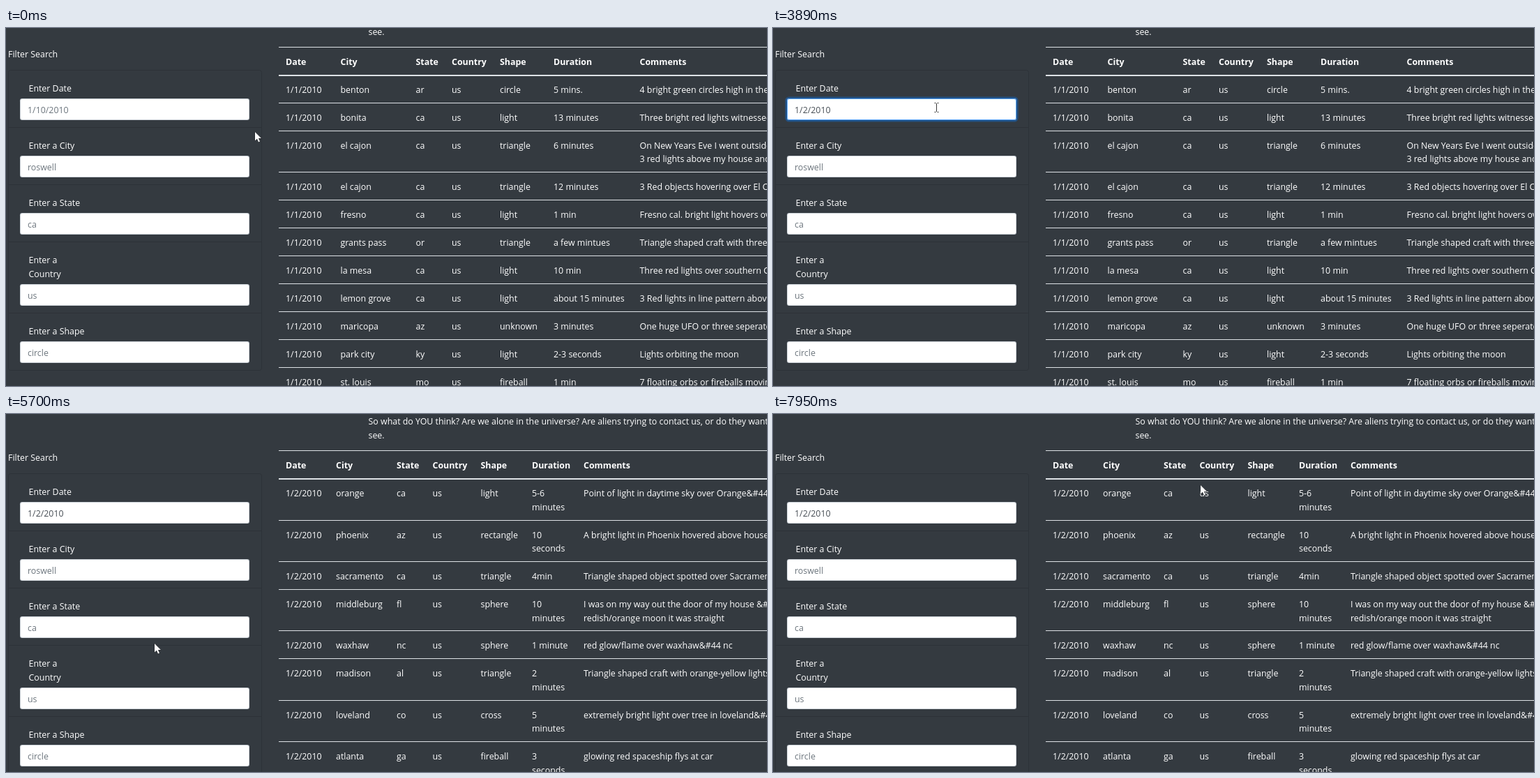
Animation of 1091x513 px, one loop 7990 ms. Source, as an HTML page with a canvas:

```html
<!DOCTYPE html>
<html lang="en">
<head>
<meta charset="utf-8">
<title>Sightings filter</title>
<style>
html, body { margin: 0; width: 100%; height: 100%; overflow: hidden; background: #343a40; }
canvas { display: block; }
</style>
</head>
<body>
<canvas id="stage" width="1091" height="513"></canvas>
<script>
const ctx = document.getElementById('stage').getContext('2d', { alpha: false });
const LOOP = 7990, FOCUS = 760, CLICK = 4780;
const ROW = 39.9, LINE = 19.6;
const FONT = '12.4px "Open Sans", "Noto Sans", sans-serif';
const HEADS = ['Date', 'City', 'State', 'Country', 'Shape', 'Duration', 'Comments'];

// Cells are separated by "|", lines inside a cell by "/ ".
const before = {
  date: '1/1/2010', shift: 0, cols: [401, 479.5, 587.5, 639, 708, 785, 908.5],
  rows: `benton|ar|circle|5 mins.|4 bright green circles high in the sky
bonita|ca|light|13 minutes|Three bright red lights witnessed
el cajon|ca|triangle|6 minutes|On New Years Eve I went outside to/ 3 red lights above my house and
el cajon|ca|triangle|12 minutes|3 Red objects hovering over El Cajon
fresno|ca|light|1 min|Fresno cal. bright light hovers over
grants pass|or|triangle|a few mintues|Triangle shaped craft with three lights
la mesa|ca|light|10 min|Three red lights over southern California
lemon grove|ca|light|about 15 minutes|3 Red lights in line pattern above
maricopa|az|unknown|3 minutes|One huge UFO or three seperate
park city|ky|light|2-3 seconds|Lights orbiting the moon
st. louis|mo|fireball|1 min|7 floating orbs or fireballs moving`.split('\n')
};
const after = {
  date: '1/2/2010', shift: 25, cols: [401, 473, 560, 611.5, 680.5, 754, 828],
  rows: `orange|ca|light|5-6/ minutes|Point of light in daytime sky over Orange&#44 CA
phoenix|az|rectangle|10/ seconds|A bright light in Phoenix hovered above houses
sacramento|ca|triangle|4min|Triangle shaped object spotted over Sacramento
middleburg|fl|sphere|10/ minutes|I was on my way out the door of my house &#44 and/ redish/orange moon it was straight
waxhaw|nc|sphere|1 minute|red glow/flame over waxhaw&#44 nc
madison|al|triangle|2/ minutes|Triangle shaped craft with orange-yellow lights
loveland|co|cross|5/ minutes|extremely bright light over tree in loveland&#44
atlanta|ga|fireball|3/ seconds|glowing red spaceship flys at car`.split('\n')
};

// Each field: box top, label, placeholder, input top
const fields = [
  [60, 'Enter Date', '1/10/2010', 101],
  [142, 'Enter a City', 'roswell', 183],
  [224, 'Enter a State', 'ca', 265],
  [306, 'Enter a/ Country', 'us', 367],
  [408, 'Enter a Shape', 'circle', 449]
];
const keyTimes = [1800, 2010, 2410, 2660, 2920, 3070, 3250, 3350];

// Pointer path: time, x, y
const path = [
  [60, 357, 149], [200, 335, 172], [330, 300, 160], [480, 255, 126], [610, 234, 114],
  [4220, 234, 114], [4330, 229, 160], [4530, 217, 290], [4680, 213, 329],
  [5700, 213, 329], [5850, 225, 340],
  [6310, 225, 340], [6400, 264, 352], [6640, 447, 406], [6900, 660, 465], [7100, 738, 486],
  [7250, 738, 486], [7350, 700, 430], [7550, 570, 220], [7660, 529, 110],
  [7770, 545, 44], [7860, 585, 70], [7950, 613, 102]
];

const clamp = v => Math.max(0, Math.min(1, v));

function pointerAt(t) {
  const i = path.findIndex(p => p[0] > t);
  if (i === 0) return path[0].slice(1);
  if (i < 0) return path.at(-1).slice(1);
  const [a, b] = [path[i - 1], path[i]], k = (t - a[0]) / (b[0] - a[0]);
  return [a[1] + (b[1] - a[1]) * k, a[2] + (b[2] - a[2]) * k];
}

function text(str, x, y, color = '#fff', bold = false) {
  ctx.font = (bold ? 'bold ' : '') + FONT;
  ctx.fillStyle = color;
  str.split('/ ').forEach((s, i) => ctx.fillText(s, x, Math.round(y + i * LINE) + 5));
}

function rule(y, h = 1) {
  ctx.fillStyle = '#dee2e6';
  ctx.fillRect(391, Math.round(y) - 1, 700, h);
}

function roundBox(x, y, w, h, r, color) {
  ctx.fillStyle = color;
  ctx.beginPath();
  ctx.roundRect(x, y, w, h, r);
  ctx.fill();
}

function drawTable({ date, shift, cols, rows }) {
  if (shift) text('So what do YOU think? Are we alone in the universe? Are aliens trying to contact us, or do they want to', 519.5, 10);
  text('see.', 519.5, 5 + shift);
  rule(28 + shift);
  HEADS.forEach((h, i) => text(h, cols[i], 48 + shift, '#fff', true));
  rule(68 + shift, 2);
  let y = 68 + shift;
  for (const row of rows) {
    const [city, state, shape, duration, comment] = row.split('|');
    [date, city, state, 'us', shape, duration, comment]
      .forEach((s, i) => text(s, cols[i], y + 20));
    y += ROW + (row.includes('/ ') ? LINE : 0);
    rule(y);
  }
}

function drawForm(t, shift) {
  const glow = clamp((t - FOCUS + 20) / 150) * clamp((CLICK + 130 - t) / 130);
  const typed = keyTimes.filter(k => k <= t);
  text('Filter Search', 3, 37 + shift);
  ctx.strokeStyle = '#2d3238';
  ctx.lineWidth = 1;
  ctx.beginPath();
  ctx.roundRect(3.5, 60.5 + shift, 363, 430, 3);
  for (const [top] of fields.slice(1)) {
    ctx.moveTo(3.5, top + shift + .5);
    ctx.lineTo(366.5, top + shift + .5);
  }
  ctx.stroke();
  fields.forEach(([top, label, hint, inputTop], i) => {
    const y = inputTop + shift;
    text(label, 32.5, top + 26 + shift);
    if (!i && glow) roundBox(17.4, y - 2.6, 334.2, 36.2, 5.5, `rgba(0,123,255,${.35 * glow})`);
    roundBox(20, y, 329, 31, 3.3, '#ced4da');
    if (!i && glow) roundBox(20, y, 329, 31, 3.3, `rgba(90,165,250,${glow})`);
    roundBox(21, y + 1, 327, 29, 2.5, '#fff');
    const value = i ? '' : '1/2/2010'.slice(0, typed.length);
    text(value || hint, 31, y + 16, value ? '#495057' : '#6c757d');
    if (i || t < FOCUS || t >= CLICK) return;
    const since = t - (typed.at(-1) ?? FOCUS + 10);
    if (since % 1080 < 540) {
      ctx.fillStyle = '#495057';
      ctx.fillRect(Math.round(31 + ctx.measureText(value).width), y + 7, 1, 17);
    }
  });
}

function drawPointer(t, shift) {
  const [x, y] = pointerAt(t).map(Math.round);
  const overInput = x > 20 && x < 349 &&
    fields.some(f => y >= f[3] + shift && y <= f[3] + shift + 31);
  if (t >= CLICK && t < CLICK + 100) {
    ctx.fillStyle = '#9b991f';
    ctx.beginPath();
    ctx.arc(x - .5, y - .5, 10, 0, Math.PI * 2);
    ctx.fill();
  }
  ctx.save();
  ctx.translate(x, y);
  ctx.lineWidth = 1;
  if (overInput) {
    ctx.strokeStyle = '#3a3a3a';
    ctx.stroke(new Path2D('M-2.5 -6.5H-.5M1.5 -6.5H3.5M.5 -6V6M-2.5 6.5H-.5M1.5 6.5H3.5'));
  } else {
    const arrow = new Path2D('M0 0V12.5L2.9 9.8L5 14.5L7 13.6L5 9.1H9Z');
    ctx.strokeStyle = '#1b1e22';
    ctx.stroke(arrow);
    ctx.fillStyle = '#fff';
    ctx.fill(arrow);
  }
  ctx.restore();
}

function frame(now) {
  const t = now % LOOP, page = t < CLICK ? before : after;
  ctx.fillStyle = '#343a40';
  ctx.fillRect(0, 0, 1091, 513);
  drawTable(page);
  drawForm(t, page.shift);
  drawPointer(t, page.shift);
  requestAnimationFrame(frame);
}
requestAnimationFrame(frame);
</script>
</body>
</html>
```
